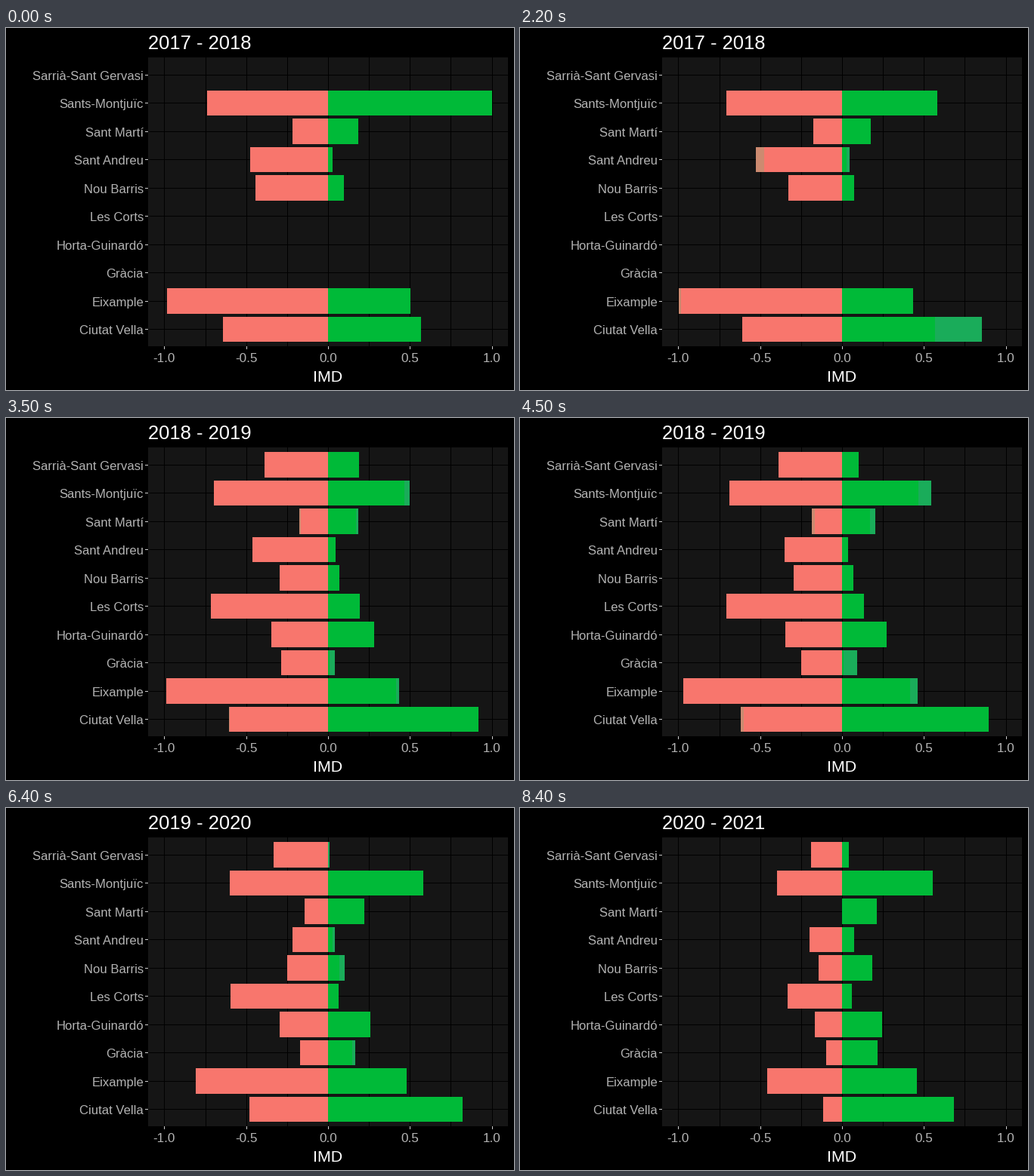
Recreate the animation shown at these times as a matplotlib script. Size 672 by 480 pixels, loop 10 s.

```python
import matplotlib.pyplot as plt
from matplotlib.animation import FuncAnimation
from matplotlib.patches import Rectangle

WIDTH, HEIGHT, DPI = 672, 480, 96
FRAMES, INTERVAL = 100, 100
FIRST_YEAR, SPAN, MOVES = 2017, 28, 3
ZERO, UNIT = 426, 216.6
TOP, STEP, HALF_BAR = 61.85, 37.53, 16.75
LEFT, RIGHT, CEILING, FLOOR = 188, 664, 39, 422

RED, RED_GROWTH, RED_FADE = "#F8766D", "#CC8A70", 0.48
GREEN, GREEN_GROWTH, GREEN_FADE = "#00BA38", "#1AAC5A", 0.93

# Name, first year shown, then the turning points of the negative and positive
# index. Years left out follow the rule in yearly_levels.
DISTRICTS = [
    ("Sarrià-Sant Gervasi", 1, (.39,), (.255, 0, .04)),
    ("Sants-Montjuïc", 0, (.74, .70, .683, .397), (1, .466, .595)),
    ("Sant Martí", 0, (.217, .165, .2, 0), (.185, .173, .226)),
    ("Sant Andreu", 0, (.475, .54, .226, .2), (.03, .05, .028, .074)),
    ("Nou Barris", 0, (.443, .295), (.097, .07, .07, .185)),
    ("Les Corts", 1, (.72, .697), (.235, .065)),
    ("Horta-Guinardó", 1, (.346,), (.288, .263)),
    ("Gràcia", 1, (.315, .203), (.007, .148, .217)),
    ("Eixample", 0, (.983, 1, .95), (.503, .415, .489)),
    ("Ciutat Vella", 0, (.64, .6, .628, .115), (.567, .93, .877, .683)),
]

plt.rcParams["font.family"] = "Liberation Sans"
fig = plt.figure(figsize=(WIDTH / DPI, HEIGHT / DPI), dpi=DPI, facecolor="black")
ax = fig.add_axes([0, 0, 1, 1])
ax.set_xlim(0, WIDTH)
ax.set_ylim(HEIGHT, 0)
ax.axis("off")


def box(x0, y0, x1, y1, color, z=1):
    patch = Rectangle((x0, y0), x1 - x0, y1 - y0, facecolor=color,
                      linewidth=0, antialiased=False, zorder=z)
    return ax.add_patch(patch)


def label(x, y, text, size, color, align="center"):
    return ax.text(x, y, text, fontsize=size, color=color, ha=align,
                   va="baseline")


def row_edges(row):
    y = TOP + row * STEP
    return round(y - HALF_BAR), round(y + HALF_BAR)


def yearly_levels(keys, opened, fade):
    """Hold the last key until the final year, which fades by a fixed share."""
    levels = [0] * opened + list(keys)
    levels += levels[-1:] * (MOVES - len(levels))
    if len(levels) == MOVES:
        levels.append(levels[-1] * fade)
    return levels


class Bar:
    """A solid bar with a paler tip where it grows past its last level."""

    def __init__(self, row, side, opened, keys, color, tip_color, fade):
        self.side, self.opened = side, opened
        self.levels = yearly_levels(keys, opened, fade)
        y0, y1 = row_edges(row)
        self.solid = box(ZERO, y0, ZERO, y1, color, 3)
        self.tip = box(ZERO, y0, ZERO, y1, tip_color, 3)

    def move(self, part, t):
        a, b = self.levels[part:part + 2]
        shown = part >= self.opened
        length = round((a + (b - a) * t) * UNIT) if shown else 0
        body = min(length, round(a * UNIT)) if t < 1 else length
        self.solid.set_width(self.side * body)
        self.tip.set_x(ZERO + self.side * body)
        self.tip.set_width(self.side * (length - body))


def draw_panel():
    box(LEFT, CEILING, RIGHT, FLOOR, "#151515")
    for k in range(-4, 5):
        x = round(ZERO + k * UNIT / 4)
        box(x, CEILING, x + 1, FLOOR, "black")
        if k % 2 == 0:
            box(x, FLOOR, x + 1, FLOOR + 4, "#CCCCCC")
            label(x, 443, f"{k / 4:.1f}", 12.8, "#B3B3B3")
    for row, (name, *_) in enumerate(DISTRICTS):
        line = row_edges(row)[1] - 17
        box(LEFT, line, RIGHT, line + 1, "black")
        box(LEFT - 4, line, LEFT, line + 1, "#CCCCCC")
        label(182, line + 7, name, 12.45, "#B3B3B3", "right")
    label(ZERO, 469, "IMD", 16, "white")


def update(frame):
    position = min(frame, MOVES * SPAN)
    year = FIRST_YEAR + position // SPAN
    part = min(position // SPAN, MOVES - 1)
    for bar in bars:
        bar.move(part, position / SPAN - part)
    title.set_text(f"{year} - {year + 1}")
    return [title]


draw_panel()
bars = []
for row, (_, opened, negative, positive) in enumerate(DISTRICTS):
    bars.append(Bar(row, -1, opened, negative, RED, RED_GROWTH, RED_FADE))
    bars.append(Bar(row, 1, opened, positive, GREEN, GREEN_GROWTH, GREEN_FADE))
title = label(LEFT, 28, "", 19.2, "white", "left")
anim = FuncAnimation(fig, update, frames=FRAMES, interval=INTERVAL,
                     repeat=True, repeat_delay=0, blit=False)
plt.show()
```
